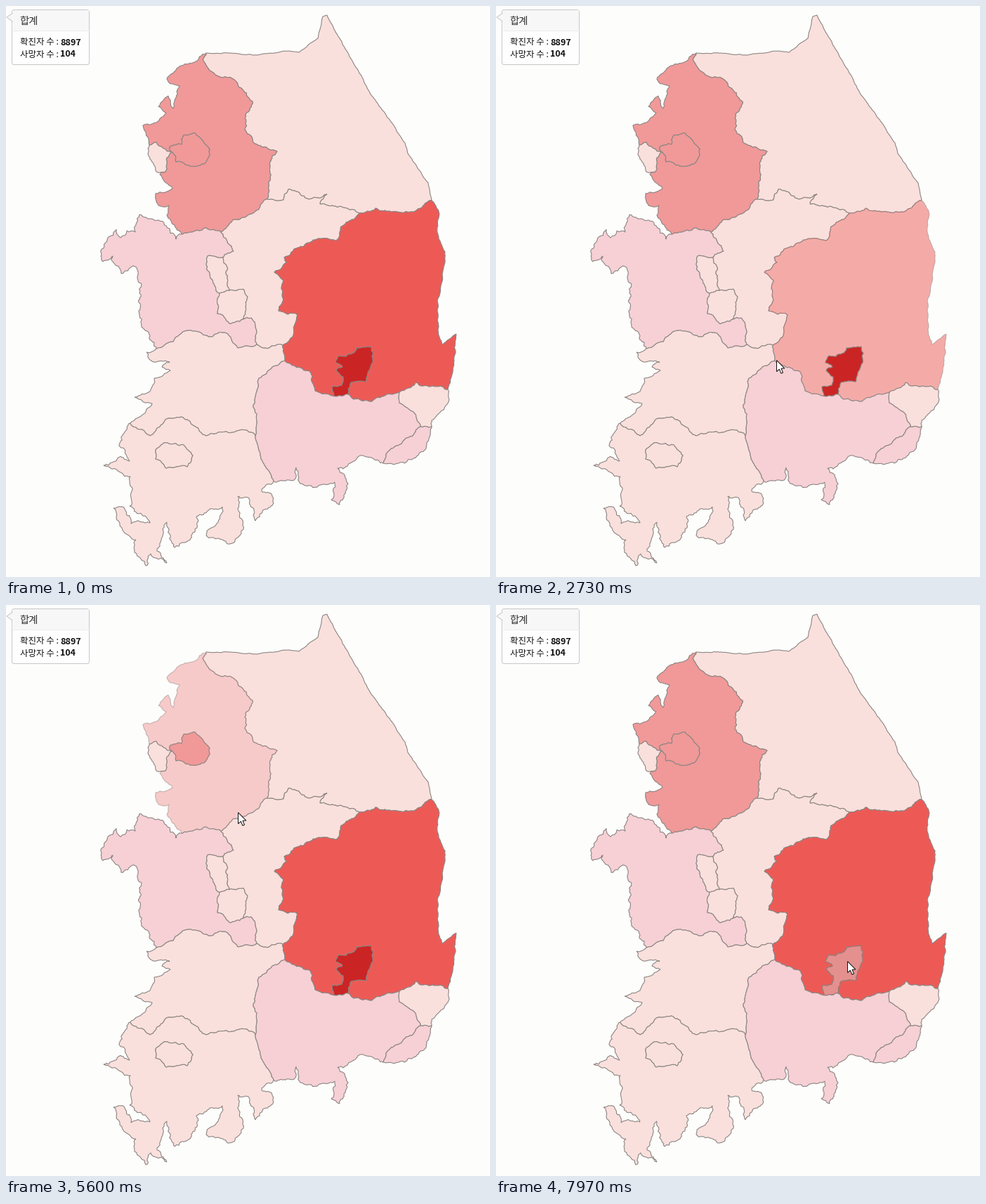
Recreate the animation shown at these times as a matplotlib script. Size 689 px wide and 813 px high, loop 8 s.

```python
import numpy as np
import matplotlib.pyplot as plt
from matplotlib.animation import FuncAnimation
from matplotlib.patches import FancyBboxPatch, PathPatch, Polygon
from matplotlib.path import Path

plt.rcParams["path.simplify"] = False

W, H, DPI = 689, 813, 100
STEP, LOOP = 40, 8000
FRAMES = LOOP // STEP
LAG = 80  # hover follows the pointer with this delay, ms
PX = 72 / DPI
INK = "#8b8583"
FONT = "Noto Sans CJK JP"
rng = np.random.default_rng(5)


def split(a, b, wiggle):
    """Points from a (left out) to b, by midpoint displacement."""
    d = b - a
    size = np.hypot(*d)
    if size < 4:
        return [b]
    normal = np.array([-d[1], d[0]]) / size
    mid = (a + b) / 2 + normal * wiggle * min(size, 12) * rng.uniform(-1, 1)
    return split(a, mid, wiggle) + split(mid, b, wiggle)


def border(*coords, wiggle=0.18):
    """Ragged line through a few x, y pairs."""
    keys = np.array(coords, float).reshape(-1, 2)
    out = [keys[0]]
    for a, b in zip(keys[:-1], keys[1:]):
        out += split(a, b, wiggle)
    return np.array(out)


def link(*arcs):
    """Chain arcs end to end, flipping those that run the other way."""
    pts = arcs[0]
    for arc in arcs[1:]:
        end = pts[-1]
        if np.hypot(*(arc[0] - end)) > np.hypot(*(arc[-1] - end)):
            arc = arc[::-1]
        pts = np.vstack([pts, arc[1:]])
    return pts


def ring(pts, sign=1):
    x, y = pts.T
    area = np.sum(x * np.roll(y, -1) - y * np.roll(x, -1))
    if area * sign < 0:
        pts = pts[::-1]
    return Path(np.vstack([pts, pts[:1]]), closed=True)


# gw Gangwon, gg Gyeonggi, ic Incheon, cb/cn Chungcheong, sj Sejong,
# dj Daejeon, gb/gn Gyeongsang, jb/jn Jeolla, us Ulsan, bs Busan
gw_coast = border(285, 67, 320, 67, 357, 70, 402, 64, 417, 66, 444, 46, 451, 15, 457, 13,
                  489, 72, 516, 120, 568, 195, 572, 210, 601, 252, 606, 277, wiggle=0.07)
gw_gb = border(606, 277, 590, 288, 562, 294, 526, 288, 503, 295)
gw_cb = border(503, 295, 467, 285, 447, 282, 457, 268, 428, 274, 411, 263, 402, 261,
               395, 276, 371, 275)
gg_gw = border(285, 67, 280, 76, 298, 98, 325, 105, 351, 136, 341, 154, 340, 176,
               354, 196, 386, 207, 379, 213, 371, 275)
gg_cb = border(371, 275, 350, 296, 319, 309, 306, 322)
gg_cn = border(306, 322, 285, 316, 250, 325)
gg_south = border(250, 325, 229, 298, 232, 284, 217, 284, 213, 267, 237, 260, 219, 240, 227, 236)
gg_ic = border(227, 236, 229, 216, 236, 208, 214, 194, 204, 198)
gg_north = border(204, 198, 195, 170, 214, 166, 228, 152, 217, 143, 231, 128, 238, 146,
                  247, 114, 229, 104, 243, 89, 268, 80, 285, 67)
ic_coast = border(227, 236, 214, 236, 205, 218, 204, 198)
seoul = border(233, 201, 250, 197, 253, 184, 269, 181, 290, 204, 284, 223, 262, 228,
               242, 222, 233, 201)
cb_gb = border(503, 295, 477, 314, 470, 334, 445, 331, 416, 344, 396, 358, 400, 365,
               382, 379, 395, 392, 388, 434, 415, 440, 409, 469, 394, 483)
cb_jb = border(394, 483, 374, 487, 357, 482)
cn_cb = border(306, 322, 324, 349, 309, 358)
sj_west = border(309, 358, 287, 356, 285, 367, 297, 398, 304, 409)
sj_east = border(309, 358, 315, 372, 318, 405)
sj_dj = border(318, 405, 304, 409)
dj_west = border(304, 409, 301, 438, 318, 452, 337, 446)
dj_east = border(318, 405, 338, 403, 344, 414, 337, 446)
cn_cb_south = border(337, 446, 349, 444, 357, 463, 357, 482)
cn_jb = border(357, 482, 330, 487, 311, 465, 293, 471, 258, 462, 238, 478, 214, 488)
cn_coast = border(214, 488, 193, 457, 193, 396, 181, 370, 164, 381, 152, 356, 138, 364,
                  135, 348, 157, 318, 163, 330, 172, 320, 184, 322, 190, 297, 228, 313,
                  242, 332, 250, 325, wiggle=0.25)
gb_coast = border(606, 277, 616, 292, 615, 325, 625, 350, 621, 392, 614, 420, 615, 462,
                  621, 482, 641, 467, 638, 505, 629, 546, wiggle=0.1)
us_gb = border(629, 546, 594, 541, 583, 536, 560, 550)
gb_gn = border(560, 550, 521, 563, 495, 560, 487, 553, 470, 556, 440, 548, 433, 521, 397, 505)
gb_jb = border(397, 505, 394, 483)
daegu = border(474, 498, 484, 499, 499, 487, 520, 485, 522, 504, 512, 535, 491, 536, 487, 553,
               467, 555, 464, 542, 478, 540, 480, 528, 470, 519, 479, 514, 469, 508, 474, 498)
jb_gn = border(397, 505, 379, 514, 360, 530, 352, 568, 357, 581, 355, 612)
jb_jn = border(355, 612, 343, 604, 285, 612, 268, 598, 254, 588, 233, 587, 205, 612, 177, 594)
jb_coast = border(177, 594, 193, 583, 208, 566, 183, 557, 205, 549, 211, 530, 234, 519,
                  222, 514, 233, 507, 208, 506, 200, 493, 214, 488)
jn_gn = border(355, 612, 362, 640, 381, 676, wiggle=0.1)
jn_east = border(381, 676, 364, 691, 379, 698, 379, 711, 355, 733, 345, 700, 330, 698,
                 338, 745, 318, 766, 285, 754, 302, 735, 308, 713, 271, 727, 262, 760,
                 240, 771, 229, 735, wiggle=0.25)
jn_west = border(229, 735, 215, 776, 229, 793, 206, 780, 199, 797, 183, 778, 185, 760,
                 162, 740, 153, 715, 163, 713, 178, 737, 205, 736, 176, 712, 177, 670,
                 163, 664, 139, 654, 167, 643, 176, 648, 161, 626, 177, 594, wiggle=0.25)
gwangju = border(213, 632, 230, 622, 253, 625, 266, 640, 258, 656, 228, 658, 213, 645, 213, 632)
gn_us = border(560, 550, 560, 565, 582, 580, 590, 599)
us_coast = border(629, 546, 627, 568, 606, 590, 606, 599)
us_bs = border(606, 599, 590, 599)
gn_bs = border(590, 599, 575, 613, 541, 638, 537, 651)
bs_coast = border(606, 599, 598, 630, 580, 644, 567, 651, 537, 651)
gn_coast = border(537, 651, 508, 640, 486, 655, 472, 658, 487, 680, 475, 710, 463, 703,
                  468, 678, 443, 685, 419, 680, 413, 657, 413, 671, 381, 676, wiggle=0.25)

fig = plt.figure(figsize=(W / DPI, H / DPI), dpi=DPI, facecolor="#fdfdfb")
ax = fig.add_axes([0, 0, 1, 1])
ax.set_xlim(0, W)
ax.set_ylim(H, 0)
ax.axis("off")

PALE, ROSE, CORAL = "#fae0dc", "#f6d0d5", "#f09998"
regions = {}


def region(name, color, *arcs, hole=None):
    path = ring(link(*arcs))
    if hole is not None:
        path = Path.make_compound_path(path, ring(hole, -1))
    regions[name] = ax.add_patch(PathPatch(path, fc=color, ec=INK, lw=1.1 * PX, zorder=1))


# Enclaves come after the region around them
region("강원", PALE, gw_coast, gw_gb, gw_cb, gg_gw)
region("경기", CORAL, gg_gw, gg_cb, gg_cn, gg_south, gg_ic, gg_north, hole=seoul)
region("인천", PALE, gg_ic[::-1], ic_coast)
region("서울", CORAL, seoul)
region("충남", ROSE, gg_cn[::-1], cn_cb, sj_west, dj_west, cn_cb_south, cn_jb, cn_coast)
region("세종", PALE, sj_east, sj_dj, sj_west)
region("대전", PALE, dj_east, dj_west, sj_dj)
region("충북", PALE, gw_cb[::-1], cb_gb, cb_jb, cn_cb_south, dj_east, sj_east, cn_cb, gg_cb)
region("경북", "#ed5a56", gw_gb[::-1], gb_coast, us_gb, gb_gn, gb_jb, cb_gb, hole=daegu)
region("대구", "#ca2524", daegu)
region("전북", PALE, cn_jb[::-1], cb_jb, gb_jb, jb_gn, jb_jn, jb_coast)
region("전남", PALE, jb_jn[::-1], jn_gn, jn_east, jn_west, hole=gwangju)
region("광주", PALE, gwangju)
region("경남", ROSE, jb_gn[::-1], gb_gn, gn_us, gn_bs, gn_coast, jn_gn)
region("울산", PALE, us_gb[::-1], us_coast, us_bs, gn_us)
region("부산", ROSE, us_bs[::-1], bs_coast, gn_bs)

# Pointer moves: start, end, x, y
START = (700, 420)
MOVES = [
    (200, 520, 512, 374), (1240, 1360, 512, 382), (1360, 1840, 503, 518),
    (2520, 2720, 404, 507), (2720, 2760, 385, 495), (2760, 3040, 300, 500),
    (3040, 3320, 245, 460), (3320, 3480, 232, 380), (3720, 3730, 232, 382),
    (4100, 4400, 285, 265), (4560, 5040, 270, 203), (5470, 5600, 329, 293),
    (5600, 5870, 355, 341), (6270, 6680, 310, 382), (6680, 6920, 307, 398),
    (7470, 7840, 500, 507),
]


def pointer_at(t):
    pos = np.array(START, float)
    for start, end, x, y in MOVES:
        pos += (np.array([x, y]) - pos) * np.clip((t - start) / (end - start), 0, 1)
    return pos


def region_at(pos):
    for name in reversed(regions):
        if regions[name].get_path().contains_point(pos):
            return name
    return None


hovered = [region_at(pointer_at(i * STEP - LAG)) for i in range(FRAMES)]


def tooltip(x, y, title, cases, deaths, change=None):
    """Callout whose pointer tip is at x, y; returns its artists."""
    rows = [("확진자 수 :", cases), ("사망자 수 :", deaths)]
    width = 110
    if change:
        rows.append(("전날 대비 증감 :", change))
        width = 110 + 7 * len(change)
    left, top = x + 7.5, y - 10.5
    height = 44 + 17 * len(rows)
    edge = dict(ec="#c8c8cc", lw=PX)
    parts = [
        ax.add_patch(FancyBboxPatch((left, top), width, height, fc="#fefefe", zorder=5,
                                    boxstyle="round,pad=0,rounding_size=3", **edge)),
        ax.add_patch(plt.Rectangle((left + 1, top + 1), width - 2, 29, fc="#f7f7f7",
                                   lw=0, zorder=5)),
        ax.add_patch(Polygon([(left + 1, y - 6), (x, y), (left + 1, y + 6)], closed=False,
                             fc="#f7f7f7", zorder=6, **edge)),
    ]
    parts += ax.plot([left + 1, left + width - 1], [top + 30] * 2, color="#ebebeb",
                     lw=PX, zorder=6)

    def text(tx, ty, s, size, **kw):
        t = ax.text(tx, ty, s, family=FONT, size=size * PX, va="baseline", zorder=7, **kw)
        parts.append(t)
        return t

    text(x + 18, y + 9.5, title, 14.4, color="#333333")
    for i, (label, value) in enumerate(rows):
        base = y + 39.5 + 17 * i
        t = text(x + 18.5, base, label, 12.5, color="#111111")
        text(t.get_window_extent().x1 + 3, base, value, 12.5, color="#111111",
             weight="normal" if i == 2 else "bold")
    return parts


tooltip(1, 16, "합계", "8897", "104")


def hover_tip(show, name, *values):
    x, y = pointer_at(show)
    return show // STEP, name, tooltip(x, y, name, *values)


# Each one opens where the pointer rests and closes once its region is left
tips = [
    hover_tip(960, "경북", "1254", "24", "+11"),
    hover_tip(2240, "대구", "6387", "79", "+43"),
    hover_tip(3720, "충남", "120", "0", "+1"),
    hover_tip(5200, "서울", "324", "0", "+10"),
    hover_tip(6040, "충북", "35", "0", "+1"),
    hover_tip(7200, "세종", "41", "0", "+0"),
]

ARROW = np.array([(0, 0), (0, 16), (3.8, 12.6), (6.4, 18.6), (9, 17.5), (6.5, 11.6), (11.3, 11.4)])
pointer = ax.add_patch(Polygon(ARROW, fc="white", ec="#111111", lw=PX, zorder=10))


def draw(i):
    for name, patch in regions.items():
        patch.set_alpha(0.5 if name == hovered[i] else 1)
    for first, name, parts in tips:
        shown = set(hovered[first:i + 1]) == {name}
        for p in parts:
            p.set_visible(shown)
    # aimed at the middle of the step so that moves end on time
    pointer.set_xy(ARROW + np.round(pointer_at(i * STEP + 10)) + 0.5)
    return []


anim = FuncAnimation(fig, draw, frames=FRAMES, interval=STEP, repeat=True,
                     repeat_delay=0, init_func=lambda: draw(0))
plt.show()
```
